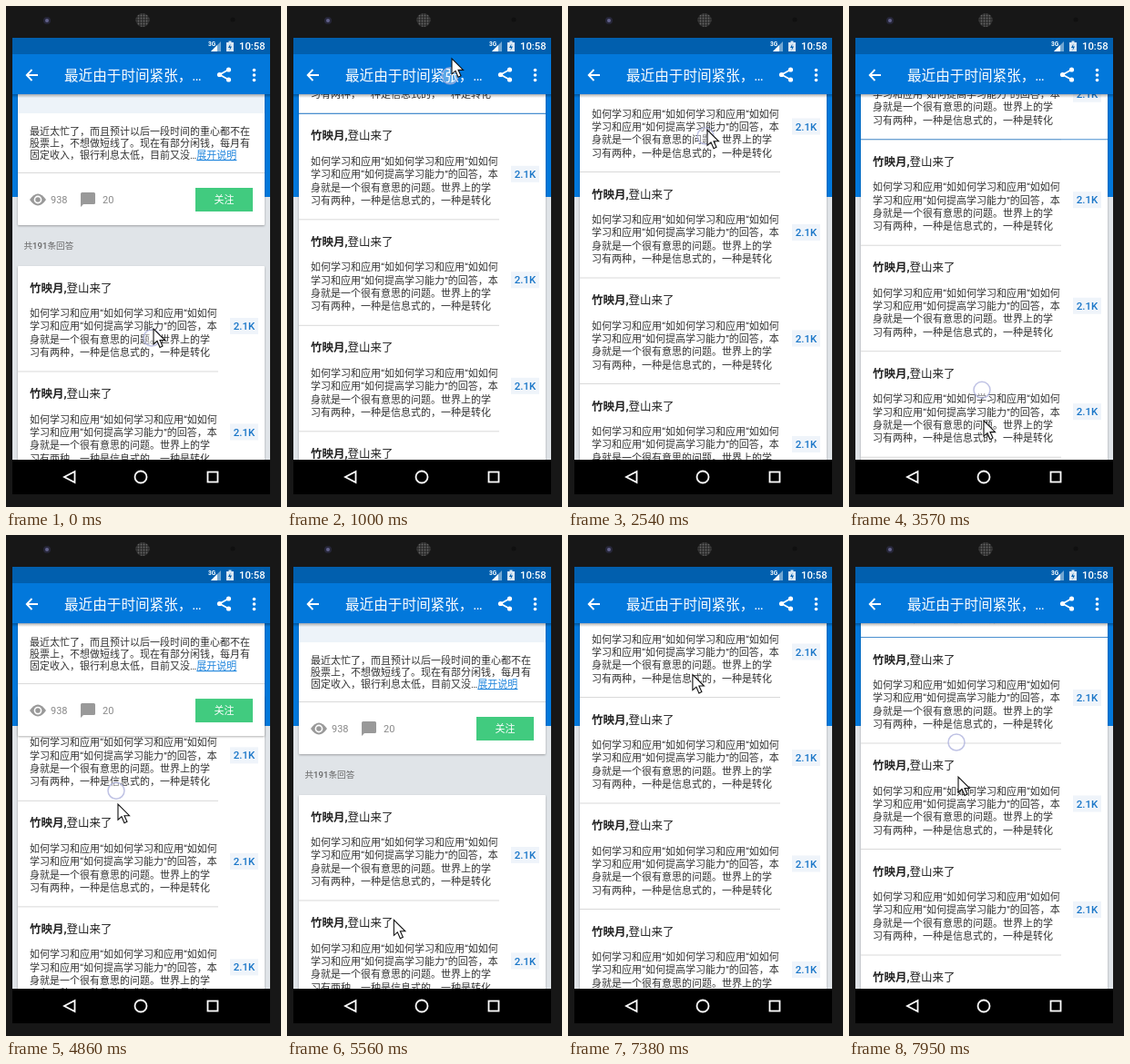
Write an HTML page that moves like this. It is 302 px wide and 551 px high and loops after 8 s.

```html
<!DOCTYPE html>
<html lang="zh-CN">
<head>
<meta charset="utf-8">
<title>回答列表滚动</title>
<style>
html, body { margin: 0; width: 100%; height: 100%; overflow: hidden; background: #171717; }
svg { display: block; width: 302px; height: 551px; }
text { font-family: Roboto, "Noto Sans CJK SC", "Noto Sans CJK", sans-serif; font-size: 11px; fill: #333; }
.name { font-size: 12.5px; fill: #222; }
.name tspan { font-weight: 700; }
.badge { font-size: 11.5px; font-weight: 500; fill: #1976c8; text-anchor: middle; }
.count { fill: #888; }
.label { font-size: 9.6px; font-weight: 500; fill: #666; }
.link { fill: #1c83dc; text-decoration: underline; }
.title { font-size: 15.6px; fill: #fff; }
.clock { font-size: 11.3px; font-weight: 500; fill: #fff; }
.button { fill: #fff; text-anchor: middle; }
.card { fill: #fff; filter: drop-shadow(0 1px 1px rgba(0, 0, 0, .3)); }
.line { fill: none; stroke: #fff; stroke-width: 1.8; }
</style>
</head>
<body>
<svg viewBox="0 0 302 551">
  <defs>
    <clipPath id="page"><rect x="7" y="97" width="283" height="402"/></clipPath>
    <clipPath id="blueZone"><rect x="7" y="97" width="283" height="113"/></clipPath>
    <linearGradient id="shade" x2="0" y2="1">
      <stop stop-opacity=".3"/><stop offset="1" stop-opacity="0"/>
    </linearGradient>
    <pattern id="mesh" width="3" height="3" patternUnits="userSpaceOnUse">
      <rect width="3" height="3" fill="#2b2b2b"/><circle cx="1.5" cy="1.5" r=".9" fill="#666"/>
    </pattern>
    <g id="item">
      <text class="name" x="26" y="28.5"><tspan>竹映月,</tspan>登山来了</text>
      <text x="26" y="56">如何学习和应用“如如何学习和应用“如如何</text>
      <text x="26" y="70.3">学习和应用“如何提高学习能力”的回答，本</text>
      <text x="26" y="84.7">身就是一个很有意思的问题。世界上的学</text>
      <text x="26" y="99">习有两种，一种是信息式的，一种是转化</text>
      <rect x="246" y="57" width="31" height="18" fill="#eff4fa"/>
      <text class="badge" x="261.5" y="70">2.1K</text>
      <path d="M13 116H233" stroke="#d9d9d9"/>
    </g>
  </defs>

  <rect width="302" height="551" fill="#171717"/>
  <circle cx="45" cy="16" r="4" fill="#262638"/>
  <circle cx="45" cy="16" r="2" fill="#62628c"/>
  <circle cx="150" cy="15.5" r="7.5" fill="url(#mesh)"/>
  <circle cx="249" cy="15" r="2.5" fill="#101010"/>

  <rect x="7" y="35" width="283" height="464" fill="#e0e4e8"/>
  <rect x="7" y="53" width="283" height="157" fill="#0278db"/>

  <g clip-path="url(#page)">
    <g id="list">
      <text class="label" x="19.5" y="267">共191条回答</text>
      <rect class="card" x="13" y="286" width="271" height="932" rx="1"/>
      <g id="items"></g>
    </g>
    <g clip-path="url(#blueZone)">
      <path id="gap" d="M13 402H284" stroke="#4a8fd0" stroke-width="1.2"/>
    </g>
    <g id="header">
      <rect class="card" x="13" y="60" width="271" height="181" rx="1"/>
      <rect x="13" y="60" width="271" height="58" fill="#edf3f9"/>
      <path d="M13 183.5H284" stroke="#d9d9d9"/>
      <text x="26" y="142">最近太忙了，而且预计以后一段时间的重心都不在</text>
      <text x="26" y="155">股票上，不想做短线了。现在有部分闲钱，每月有</text>
      <text x="26" y="168">固定收入，银行利息太低，目前又没…<tspan class="link">展开说明</tspan></text>
      <path d="M26 213Q35 200 44 213Q35 226 26 213Z" fill="#999"/>
      <circle cx="35" cy="213" r="3.6" fill="#999" stroke="#fff" stroke-width="1.6"/>
      <text class="count" x="49" y="217">938</text>
      <path d="M83.500 205H96.500Q98 205 98 206.500V216.500Q98 218 96.500 218H85L82 221V206.500Q82 205 83.500 205Z" fill="#999"/>
      <text class="count" x="106" y="217">20</text>
      <rect x="208" y="200" width="63" height="26" fill="#41cb7f"/>
      <text class="button" x="239.500" y="217">关注</text>
    </g>
    <rect x="7" y="97" width="283" height="4" fill="url(#shade)"/>
  </g>

  <rect x="7" y="35" width="283" height="18" fill="#015fae"/>
  <rect x="7" y="53" width="283" height="44" fill="#0278db"/>
  <text x="222" y="44" style="font-size:6.5px;font-weight:700;fill:#fff">3G</text>
  <path d="M225 50L236 39V50Z" fill="#fff" fill-opacity=".45"/>
  <path d="M225 50L232 43V50Z" fill="#fff"/>
  <path d="M242 40H244.500V38.500H247.500V40H250V50H242Z" fill="#fff" fill-opacity=".85"/>
  <path d="M246.500 41.500L244 46H246L245.500 49L248 44.500H246Z" fill="#015fae"/>
  <text class="clock" x="256" y="48">10:58</text>
  <path class="line" d="M35 76H23M28.500 70L22.700 76L28.500 82"/>
  <text class="title" x="64" y="81.500">最近由于时间紧张，…</text>
  <path class="line" d="M244.500 70L234.500 75.500L244.500 81" stroke-width="1.6"/>
  <g fill="#fff">
    <circle cx="244.500" cy="70" r="2.600"/><circle cx="234.500" cy="75.500" r="2.600"/><circle cx="244.500" cy="81" r="2.600"/>
    <circle cx="272.500" cy="70.500" r="1.800"/><circle cx="272.500" cy="76" r="1.800"/><circle cx="272.500" cy="81.500" r="1.800"/>
  </g>

  <rect x="7" y="499" width="283" height="38"/>
  <path class="line" d="M75.500 512V524L64 518Z"/>
  <circle class="line" cx="148" cy="518" r="6.500"/>
  <rect class="line" x="221.500" y="512.500" width="11" height="11"/>

  <circle id="touch" r="9" fill="#fff" fill-opacity=".35" stroke="#a9aedb" stroke-opacity=".75" stroke-width="1.500"/>
  <path id="cursor" d="M0 0V17L4 13.500L7 20.500L10 19L7 12.500H12.500Z" fill="#fff" stroke="#111" stroke-width="1.100"/>
</svg>
<script>
const DURATION = 8000, ITEM_HEIGHT = 116.5, HEADER_TRAVEL = 146;
const byId = id => document.getElementById(id);

// Each track is a list of [time, value, ...].
const scrollTrack = [[60, 0], [1000, 283.5], [1150, 310], [1800, 310], [2450, 569], [2600, 569],
  [3570, 255.5], [3700, 225], [4300, 222], [4860, 110], [5150, 0], [6690, 0], [6850, 38],
  [7200, 340], [7620, 340], [7950, 289.5]];
const headerTrack = [[4300, HEADER_TRAVEL], [4860, 20], [5150, 0], [6600, 0], [6601, HEADER_TRAVEL]];
const cursorTrack = [[60, 162, 355], [1000, 181, 58], [1150, 182, 33], [1750, 160, 425], [2450, 153, 136],
  [2540, 153, 136], [3570, 148, 456], [3700, 147, 472], [4250, 126, 172], [4860, 123, 296],
  [5730, 116, 454], [6090, 116, 454], [6370, 168, 424], [6670, 168, 424], [6850, 171, 212],
  [7100, 172, 110], [7500, 122, 172], [7620, 121, 178], [7950, 120, 266]];
const touchTrack = [[60, 365], [1000, 77], [1200, 45], [1780, 430], [2450, 143], [2600, 143],
  [3570, 422], [3720, 465], [4250, 178], [4860, 281], [5250, 385], [6690, 430], [6850, 409],
  [7200, 115], [7600, 180], [7950, 228]];
const touches = [[0, 1200], [1780, 2560], [2600, 3720], [4250, 5250], [6690, 7220], [7600, 8000]];

function sample(track, time) {
  const next = track.findIndex(key => key[0] > time);
  if (next === 0) return track[0].slice(1);
  if (next < 0) return track.at(-1).slice(1);
  const a = track[next - 1], b = track[next];
  const part = (time - a[0]) / (b[0] - a[0]);
  return a.slice(1).map((value, i) => value + (b[i + 1] - value) * part);
}

function move(id, x, y) {
  byId(id).setAttribute("transform", `translate(${x.toFixed(2)} ${y.toFixed(2)})`);
}

byId("items").innerHTML = Array.from({ length: 8 }, (_, i) =>
  `<use href="#item" y="${286 + i * ITEM_HEIGHT}"/>`).join("");

const start = performance.now();
function draw(now) {
  const time = Math.max(0, now - start) % DURATION;
  const [scroll] = sample(scrollTrack, time);
  const [limit] = sample(headerTrack, time);
  const [x, y] = sample(cursorTrack, time);
  const [touchY] = sample(touchTrack, time);
  move("list", 0, -scroll);
  move("gap", 0, -scroll);
  move("header", 0, -Math.min(scroll, limit));
  move("cursor", x, y);
  move("touch", x - 2, touchY);
  const touching = touches.some(([from, to]) => time >= from && time < to);
  byId("touch").style.visibility = touching ? "visible" : "hidden";
  requestAnimationFrame(draw);
}
draw(start);
</script>
</body>
</html>
```
